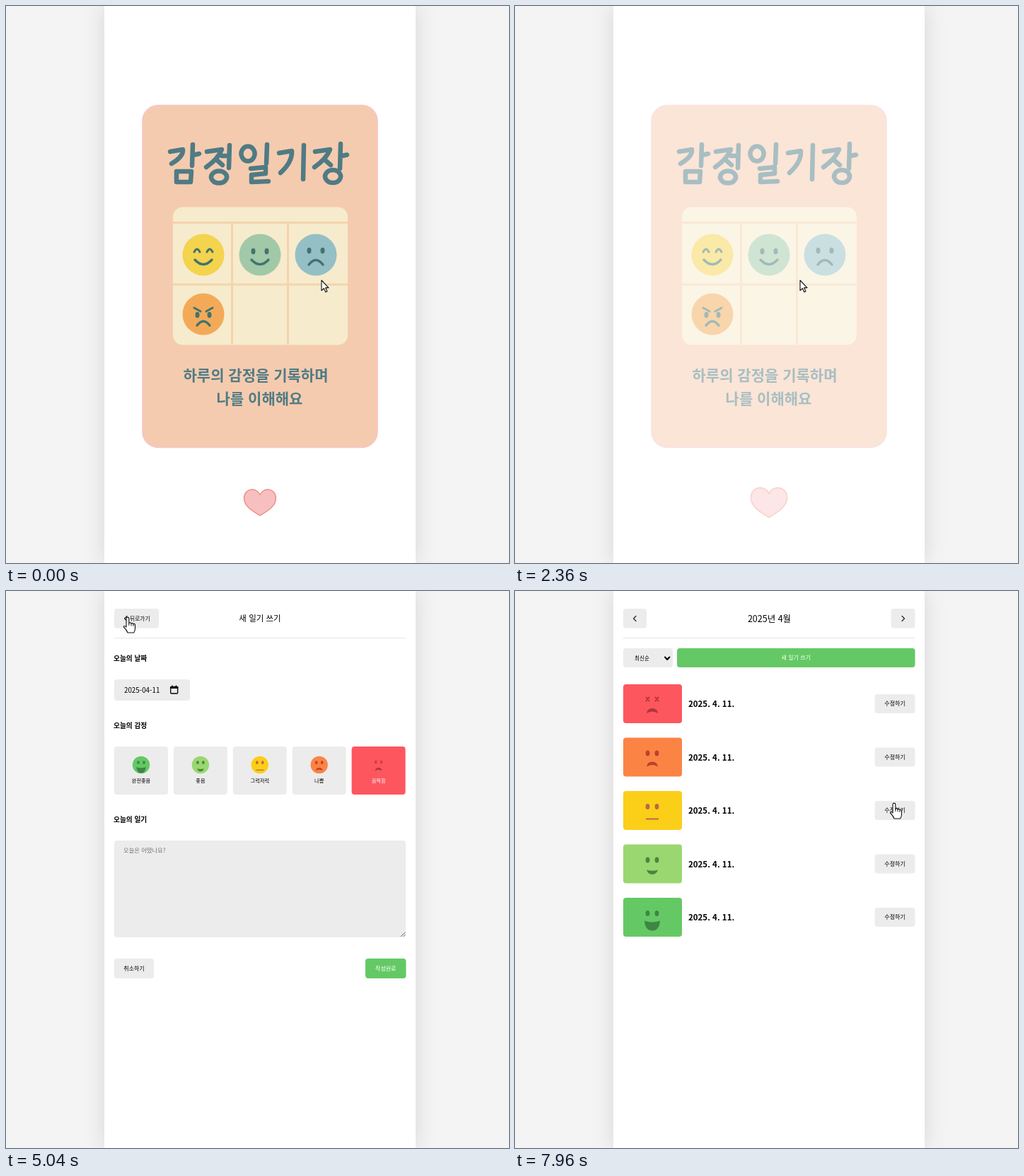
Recreate the animation shown at these times as an HTML page. Size 711x788 px, loop 8000 ms.

```html
<!DOCTYPE html>
<html lang="ko">
<head>
<meta charset="utf-8">
<title>감정일기장</title>
<style>
  html, body { margin: 0; width: 100%; height: 100%; overflow: hidden; background: #f4f4f4; }
  #app { position: absolute; left: 139px; top: 0; width: 440px; height: 100%; background: #fff; box-shadow: 0 0 29px rgba(100, 100, 100, .2); }
  svg { position: absolute; left: 0; top: 0; width: 711px; height: 788px; font-family: "Noto Sans CJK KR", "Noto Sans CJK", sans-serif; }
  .line { fill: none; stroke-linecap: round; stroke-linejoin: round; }
  .pointer { fill: #fff; stroke: #111; stroke-width: 1.1; stroke-linejoin: round; }
</style>
</head>
<body>
<div id="app"></div>
<svg id="stage" viewBox="0 0 711 788"></svg>
<script>
const LOOP = 8000, BEAT = 510, CLICK_DELAY = 160;
const GRAY = '#ececec', GREEN = '#64c964', TEAL = '#4f7b84', DARK_TEAL = '#42736f';
const LEFT = 153, RIGHT = 565;

// Drawing helpers
const box = (x, y, w, h, fill = GRAY, r = 4, extra = '') =>
  `<rect x="${x}" y="${y}" width="${w}" height="${h}" rx="${r}" fill="${fill}" ${extra}/>`;
const line = (d, stroke, width, extra = '') =>
  `<path class="line" d="${d}" stroke="${stroke}" stroke-width="${width}" ${extra}/>`;
const text = (x, y, size, str, { anchor = 'middle', fill = '#000', weight = 400, id = '' } = {}) =>
  `<text id="${id}" x="${x}" y="${y + size * .36}" font-size="${size}" text-anchor="${anchor}" fill="${fill}" font-weight="${weight}">${str}</text>`;
const group = (id, content) => `<g id="${id}">${content}</g>`;

// Areas that turn the pointer into a hand
const hotAreas = { splash: [], list: [], editor: [], rows: [] };
const hot = (page, x, y, w, h) => { hotAreas[page].push([x, y, w, h]); return ''; };

const button = (page, x, y, w, h, label = '', fill = GRAY, color = '#000') =>
  hot(page, x, y, w, h) + box(x, y, w, h, fill) + text(x + w / 2, y + h / 2, 8, label, { fill: color });
const chevron = (x, dir) => line(`M${x} 35.5l${dir * 3.5} 3.5l${-dir * 3.5} 3.5`, '#222', 1.2);
const rule = line(`M${LEFT} 66.5H${RIGHT}`, '#e4e4e4', 1);

// Moods, best first
const FROWN = 'M-8 13.5Q-7 6.5 0 6.5T8 13.5Q0 8.5-8 13.5Z';
const moods = [
  { name: '완전좋음', color: GREEN, ink: '#3f8546', mouth: 'M-11 5Q0 9 11 5Q10 19 0 19T-11 5Z' },
  { name: '좋음', color: '#9bd770', ink: '#468640', mouth: 'M-8 8.5Q0 11 8 8.5Q6 15 0 15T-8 8.5Z' },
  { name: '그럭저럭', color: '#fbce18', ink: '#bd664b', mouth: 'M-9 11H9V13H-9Z' },
  { name: '나쁨', color: '#fb8445', ink: '#b9432f', mouth: FROWN },
  { name: '끔찍함', color: '#fd565f', ink: '#b3343c', mouth: FROWN, crossed: true },
];

function face({ color, ink, mouth, crossed }, x, y, scale) {
  const eye = ex => crossed
    ? line(`M${ex - 2} -9l4 5m0 -5l-4 5`, ink, 2)
    : `<ellipse cx="${ex}" cy="-5.5" rx="2.9" ry="3.9" fill="${ink}"/>`;
  return `<g transform="translate(${x} ${y}) scale(${scale})"><circle r="20" fill="${color}"/>
    ${eye(-6.5)}${eye(6.5)}<path d="${mouth}" fill="${ink}"/></g>`;
}

// Hand lettering built from shared letter parts
const giyeok = (x, y, drop) => `M${x} ${y}l18 -3q1 ${drop / 2} -16 ${drop}`;
const jieut = (x, y) => `M${x} ${y}l21 -3q-5 13 -22 25m14 -11l9 8`;
const ring = (x, y, rx, ry) => `M${x} ${y - ry}a${rx} ${ry} 0 1 0 .1 0Z`;
const stem = (x, y, h) => `M${x} ${y}l-1 ${h}`;
const branch = (x, y, h) => `${stem(x, y, h)}M${x} ${y + h / 2}l9 -2`;
const lettering = [
  giyeok(232, 206, 20), branch(264, 196, 30), 'M241 234h21l-1 15h-20z',
  jieut(284, 206), 'M305 212h10', stem(316, 197, 32), ring(301, 242, 11, 8.5),
  ring(342, 209, 9.5, 10.5), stem(369, 196, 27), 'M346 230l21 -2v9l-20 2v10l24 -1',
  giyeok(386, 208, 31), stem(421, 197, 48),
  jieut(437, 206), branch(473, 195, 35), ring(462, 241, 11, 9),
].join('');

// Splash card
const sticker = (x, y, color, eyes, mouth) =>
  `<g transform="translate(${x} ${y})"><circle r="29.5" fill="${color}"/>${eyes}${line(mouth, DARK_TEAL, 3.4)}</g>`;
const dots = (dx, y) => [-dx, dx].map(x => `<ellipse cx="${x}" cy="${y}" rx="3" ry="4.2" fill="${DARK_TEAL}"/>`).join('');
const SMILE = 'M-12 7Q0 20 12 7', SAD = 'M-10 14Q0 1 10 14';

const splash =
  box(193, 140.5, 332, 484, '#f5cbaf', 22, 'stroke="#f8c2c8" stroke-width="1.5"') +
  line(lettering, TEAL, 6.5, 'role="img" aria-label="감정일기장"') +
  box(236, 284.5, 247, 195, '#f6ebcd', 14) +
  line('M236 306.5h247M236 394h247M319.5 306v173M398.5 306v173', '#f5d3ab', 3, 'style="stroke-linecap:butt"') +
  sticker(279, 352, '#f4d34d', line('M-13 -4q4 -8 8 0m10 0q4 -8 8 0', DARK_TEAL, 3), SMILE) +
  sticker(359, 352, '#a1c9a8', dots(9.5, -5), SMILE) +
  sticker(438, 352, '#94bfc4', dots(9.5, -6), SAD) +
  sticker(279, 436, '#f3aa58', dots(8.5, 1) + line('M-13 -9l9 5m17 -5l-9 5', DARK_TEAL, 3), 'M-9 16Q0 4 9 16') +
  text(353, 522, 21, '하루의 감정을 기록하며', { fill: TEAL, weight: 700 }) +
  text(358.5, 555, 21, '나를 이해해요', { fill: TEAL, weight: 700 }) +
  '<path id="heart" d="M0 -11C-5 -22-22 -20-22 -6C-22 6-8 13 0 18C8 13 22 6 22 -6C22 -20 5 -22 0 -11Z" fill="#f8bfc0" stroke="#eb9386" stroke-width="1.5"/>';

// Diary list
function row(mood, i) {
  const y = 132 + i * 75.5;
  return hot('rows', LEFT, y, 412, 55) + box(LEFT, y, 83, 55, mood.color) + face(mood, 194, y + 27.5, 1) +
    text(245, y + 28, 11.5, '2025. 4. 11.', { anchor: 'start', weight: 700 }) +
    button('rows', 508.5, y + 14, 57, 27, '수정하기');
}
const list =
  button('list', LEFT, 25, 33, 27.5) + chevron(171, -1) +
  button('list', 531.5, 25, 34, 27.5) + chevron(547, 1) +
  text(359.5, 39, 12.5, '', { id: 'month' }) + rule +
  box(LEFT, 81, 70, 27) + text(179.5, 95, 7.6, '최신순') + line('M212 93.5l3.2 3.5l3.2 -3.5', '#000', 2) +
  button('list', 229, 81, 336.5, 27, '새 일기 쓰기', GREEN, '#fff') +
  group('rows', [...moods].reverse().map(row).join(''));

// Editor
const heading = (y, str) => text(152, y, 9.7, str, { anchor: 'start', weight: 700 });
const cellX = i => LEFT + i * 83.9;
const cell = (mood, i) => hot('editor', cellX(i), 220, 76, 68) +
  box(cellX(i), 220, 76, 68, GRAY, 4, `id="cell${i}"`) + face(mood, cellX(i) + 38, 246, .61) +
  text(cellX(i) + 38, 268, 7.2, mood.name, { id: 'label' + i });
const calendar = box(232.7, 135.5, 10, 9.5, 'none', 1, 'stroke="#000" stroke-width="1.3"') +
  box(232, 135, 11.5, 3, '#000', 1) + line('M235 134v2m5.5 -2v2', '#000', 1.3);
const editor =
  button('editor', LEFT, 25, 63, 27.5) + chevron(171, -1) + text(175, 39, 7.8, '뒤로가기', { anchor: 'start' }) +
  text(359, 39, 11.5, '새 일기 쓰기') + rule +
  heading(96, '오늘의 날짜') + box(LEFT, 125, 107, 30) + text(167, 140, 9.8, '2025-04-11', { anchor: 'start' }) + calendar +
  heading(191, '오늘의 감정') + moods.map(cell).join('') +
  heading(324, '오늘의 일기') + box(LEFT, 353, 412, 137) +
  text(166, 367, 8.3, '오늘은 어땠나요?', { anchor: 'start', fill: '#757575' }) +
  line('M558.5 488.5l5.5 -5.5m-2 5.5l2 -2', '#666', 1) +
  button('editor', LEFT, 520, 56, 28, '취소하기') + button('editor', 508, 520, 57.5, 28, '작성완료', GREEN, '#fff');

const cursor =
  '<path id="arrow" class="pointer" d="M0 0v14.5l3.5 -3l2.3 5.2l2.2 -1l-2.3 -5.1h4.3z"/>' +
  group('hand', '<path class="pointer" d="M-2 13V2a1.9 1.9 0 0 1 3.8 0v6.5a1.8 1.8 0 0 1 3.2 .5a1.8 1.8 0 0 1 3 .8a1.5 1.5 0 0 1 2.5 1.2v5q0 3-1.8 6h-8.7q-1.5-4-5.5-8q-.5-3 3.500 0z"/>' +
    line('M1.8 8.5v3m3.2 -2.500v3m3 -2v2.500', '#111', 1));

const stage = document.getElementById('stage');
stage.innerHTML = group('splash', splash) + group('list', list) + group('editor', editor) + group('cursor', cursor);
const $ = id => document.getElementById(id);
const show = (id, on) => { $(id).style.display = on ? '' : 'none'; };

// The visit: pointer moves, some ending in a click that changes the state
const moves = [], changes = [];
const change = (time, state) => changes.push({ time, state });
function move(from, to, [x, y], clicked) {
  moves.push({ from, to, x, y });
  if (clicked) change(to + CLICK_DELAY, clicked);
}
const origin = { x: 446, y: 388 };
const prev = [172, 37], next = [546, 35];

move(160, 800, [403, 388]);
change(2440, { page: 'list' });
move(2720, 2960, [452, 131]);
move(3080, 3240, [480, 86]);
move(3440, 3560, [466, 87], { page: 'editor' });
move(3720, 3960, [cellX(0) + 2, 246]);
move(3960, 4080, [cellX(1) + 37, 246], { mood: 1 });
move(4200, 4360, [508, 246], { mood: 4 });
move(4520, 4760, [137, 18]);
move(4760, 4920, prev, { page: 'list' });
move(5080, 5360, [335, 160]);
move(5400, 5560, [506, 152]);
move(5560, 5760, [409, 158]);
move(5880, 6020, next, { month: 5 });
move(6180, 6320, prev, { month: 4 });
move(6480, 6720, next, { month: 5 });
move(6880, 7120, [160, 30], { month: 4 });
move(7300, 7600, [546, 180]);
move(7600, 7920, [536, 300]);

const stateAt = t => Object.assign({ page: 'splash', month: 4, mood: 2 },
  ...changes.filter(c => c.time <= t).map(c => c.state));

const smooth = u => u * u * (3 - 2 * u);
function pointerAt(t) {
  let { x, y } = origin;
  for (const m of moves) {
    const k = smooth(Math.min(1, Math.max(0, (t - m.from) / (m.to - m.from))));
    x += (m.x - x) * k;
    y += (m.y - y) * k;
  }
  return { x, y };
}

function drawPointer(t, { page, month }) {
  const { x, y } = pointerAt(t);
  const areas = page === 'list' && month === 4 ? [...hotAreas.list, ...hotAreas.rows] : hotAreas[page];
  const hand = areas.some(([ax, ay, w, h]) => x >= ax && x <= ax + w && y >= ay && y <= ay + h);
  $('cursor').setAttribute('transform', `translate(${x} ${y})`);
  show('hand', hand);
  show('arrow', !hand);
}

function drawSplash(t) {
  const beat = (1 - Math.cos(t / BEAT * 2 * Math.PI)) / 2;
  $('heart').setAttribute('transform', `translate(359 702.5) scale(${1.02 + .17 * beat})`);
  $('heart').setAttribute('opacity', 1 - .25 * beat);
  $('splash').setAttribute('opacity', 1 - Math.max(0, t - 2200) / 320);
}

function draw(t) {
  const state = stateAt(t);
  for (const id of ['splash', 'list', 'editor']) show(id, id === state.page);
  if (state.page === 'splash') drawSplash(t);
  $('month').textContent = `2025년 ${state.month}월`;
  show('rows', state.month === 4);
  moods.forEach((mood, i) => {
    const picked = i === state.mood;
    $('cell' + i).setAttribute('fill', picked ? mood.color : GRAY);
    $('label' + i).setAttribute('fill', picked ? '#fff' : '#000');
  });
  drawPointer(t, state);
}

const start = performance.now();
function tick() {
  draw((performance.now() - start) % LOOP);
  requestAnimationFrame(tick);
}
tick();
</script>
</body>
</html>
```
